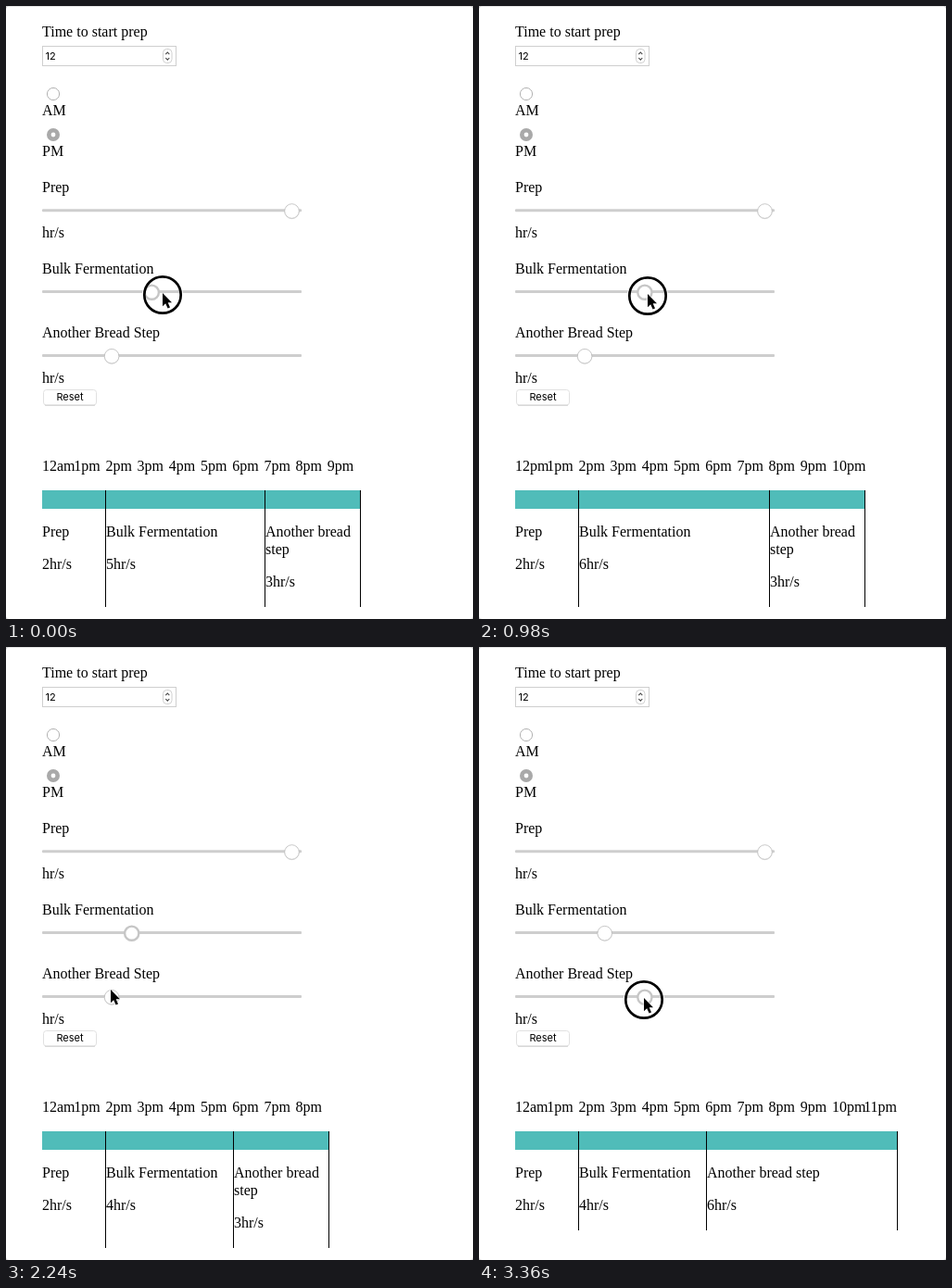
Animation of 504x662 px, one loop 3430 ms. Source, as an HTML page:

```html
<!DOCTYPE html>
<html lang="en">
<head>
<meta charset="utf-8">
<title>Bread schedule</title>
<style>
html, body { margin: 0; width: 100%; height: 100%; overflow: hidden; background: #fff; }
svg { display: block; width: 504px; height: 662px; }
text { font: 16px "Liberation Serif", "Times New Roman", serif; fill: #000; white-space: pre; }
.ui { font: 11px Inter, "Liberation Sans", sans-serif; }
</style>
</head>
<body>
<svg id="stage" viewBox="0 0 504 662" xmlns="http://www.w3.org/2000/svg"></svg>
<script>
const LOOP = 3430, STEP = 70, LEFT = 39, HOUR = 34.31, PREP = 2;
const stage = document.getElementById('stage');

function add(tag, attrs, parent = stage, content) {
  const el = document.createElementNS('http://www.w3.org/2000/svg', tag);
  set(el, attrs);
  if (content !== undefined) el.textContent = content;
  parent.appendChild(el);
  return el;
}
function set(el, attrs) {
  for (const key in attrs) el.setAttribute(key, attrs[key]);
}
const label = (x, y, content, parent) => add('text', { x, y }, parent, content);

// Pointer path: time, x, y of the tip
const path = [
  [0, 169, 310], [560, 217, 311], [630, 217, 311], [980, 182, 311],
  [1050, 182, 311], [1260, 157, 310], [1330, 157, 310], [1400, 148, 309],
  [1610, 130, 307], [1680, 137, 310], [1750, 137, 310], [2240, 113, 370],
  [2310, 110, 373], [2380, 109, 374], [2450, 109, 374], [2800, 146, 378],
  [3010, 179, 379], [3080, 187, 382], [3220, 187, 382], [3360, 178, 379]
];
// Slider values: time, hours
const bulkSteps = [[0, 5], [70, 6], [280, 7], [490, 8], [770, 7], [910, 6], [1190, 5], [1470, 4]];
const breadSteps = [[0, 3], [2730, 4], [2940, 6]];

function pointerAt(t) {
  const i = path.findIndex(k => k[0] >= t);
  if (i < 1) return path[i < 0 ? path.length - 1 : 0].slice(1);
  const a = path[i - 1], b = path[i], u = (t - a[0]) / (b[0] - a[0]);
  return [a[1] + (b[1] - a[1]) * u, a[2] + (b[2] - a[2]) * u];
}
const valueAt = (steps, t) => steps.filter(s => s[0] <= t).pop()[1];
const thumbX = hours => 49.3 + 21.6 * hours;
const edge = hours => Math.round(LEFT - 0.2 + HOUR * hours);

function slider(y) {
  add('rect', { x: LEFT, y: y - 1.5, width: 280, height: 3, rx: 1, fill: '#cecece' });
  const g = add('g', {});
  add('circle', { cy: y + 1.2, r: 8.2, fill: '#000', opacity: 0.1 }, g);
  const disc = add('circle', { cy: y + 0.7, fill: '#fff' }, g);
  return (x, focused) => {
    set(g, { transform: `translate(${x} 0)` });
    set(disc, focused
      ? { r: 7.6, stroke: '#c6c6c6', 'stroke-width': 2.4 }
      : { r: 7.8, stroke: '#bcbcbc', 'stroke-width': 0.8 });
  };
}

// Page and form
add('rect', { width: 504, height: 662, fill: '#d2d2d2' });
add('rect', { y: 0.6, width: 504, height: 661.4, rx: 3.5, fill: '#fff' });

label(LEFT, 33, 'Time to start prep');
add('rect', { x: 39.5, y: 43.5, width: 144, height: 21, fill: '#fff', stroke: '#cfcfcf' });
add('text', { x: 42.5, y: 58, class: 'ui' }, stage, '12');
add('rect', { x: 169.5, y: 46.5, width: 9.5, height: 15, rx: 4, fill: '#fff', stroke: '#c4c4c4', 'stroke-width': 0.8 });
add('path', { d: 'M172.3 52.2l2-2.2 2 2.2M172.3 56l2 2.2 2-2.2', fill: 'none', stroke: '#444', 'stroke-width': 1.1 });

add('circle', { cx: 51, cy: 95, r: 6.6, fill: '#fff', stroke: '#aaa', 'stroke-width': 0.9 });
label(LEFT, 118, 'AM');
add('circle', { cx: 51, cy: 139, r: 7, fill: '#a9a9a9' });
add('circle', { cx: 51, cy: 139, r: 2.4, fill: '#fff' });
label(LEFT, 162, 'PM');

label(LEFT, 201, 'Prep');
label(LEFT, 250, 'hr/s');
label(LEFT, 289, 'Bulk Fermentation');
label(LEFT, 358, 'Another Bread Step');
label(LEFT, 407, 'hr/s');
slider(220.8)(308.5, false);
const bulkSlider = slider(308.5);
const breadSlider = slider(377.5);

add('rect', { x: 40.5, y: 414.5, width: 57, height: 16.5, rx: 3, fill: '#fff', stroke: '#dedede', 'stroke-width': 0.9 });
add('path', { d: 'M42 431.2h54', stroke: '#c6c6c6', 'stroke-width': 0.8 });
add('text', { x: 69, y: 426, class: 'ui', 'text-anchor': 'middle' }, stage, 'Reset');

// Schedule
const hours = Array.from({ length: 13 }, (_, i) =>
  label(LEFT + 34.2 * i, 502, i === 12 ? '12am' : `${i || 12}pm`));
const bar = add('rect', { x: LEFT, y: 523, height: 20, fill: '#50bcb9' });
const rules = [0, 1, 2].map(() => add('rect', { y: 523, width: 1, fill: '#000' }));
label(LEFT, 573, 'Prep');
label(LEFT, 608, PREP + 'hr/s');
label(108, 573, 'Bulk Fermentation');
const bulkHours = label(108, 608, '');
const bread = add('g', {});
const breadTitle = label(0, 573, '', bread);
const breadWrap = label(0, 592, 'step', bread);
const breadHours = label(0, 608, '', bread);

// Pointer
const pointer = add('g', {});
const ring = add('g', {}, pointer);
add('circle', { cy: 2, r: 21.2, fill: 'none', stroke: '#fff', 'stroke-width': 1.6 }, ring);
add('circle', { cy: 2, r: 19.7, fill: 'none', stroke: '#000', 'stroke-width': 2.7 }, ring);
add('path', {
  d: 'M0 0V14.2L3.2 11.2L5.6 16.6L8 15.6L5.7 10.3H10Z',
  fill: '#000', stroke: '#fff', 'stroke-width': 1, 'paint-order': 'stroke'
}, pointer);

function draw(time) {
  const t = Math.floor((time % LOOP) / STEP) * STEP;
  const bulk = valueAt(bulkSteps, t), extra = valueAt(breadSteps, t);
  const total = PREP + bulk + extra;
  const onBread = t >= 2520;
  const wrapped = extra < 4;

  bulkSlider(thumbX(bulk), !onBread);
  breadSlider(thumbX(extra), onBread);

  hours[0].textContent = total === 11 || total === 13 ? '12pm' : '12am';
  hours.forEach((el, i) => set(el, { visibility: i < total ? 'visible' : 'hidden' }));

  const ends = [PREP, PREP + bulk, total].map(edge);
  set(bar, { width: ends[2] - LEFT });
  rules.forEach((el, i) => set(el, { x: ends[i], height: wrapped ? 126 : 107 }));

  bulkHours.textContent = bulk + 'hr/s';
  set(bread, { transform: `translate(${ends[1] + 1} 0)` });
  breadTitle.textContent = wrapped ? 'Another bread' : 'Another bread step';
  set(breadWrap, { visibility: wrapped ? 'visible' : 'hidden' });
  set(breadHours, { y: wrapped ? 627 : 608 });
  breadHours.textContent = extra + 'hr/s';

  const [x, y] = pointerAt(t);
  set(pointer, { transform: `translate(${x} ${y})` });
  set(ring, { visibility: t < 1680 || onBread ? 'visible' : 'hidden' });
}

let start;
function tick(now) {
  if (start === undefined) start = now;
  draw(Math.max(0, now - start));
  requestAnimationFrame(tick);
}
draw(0);
requestAnimationFrame(tick);
</script>
</body>
</html>
```
